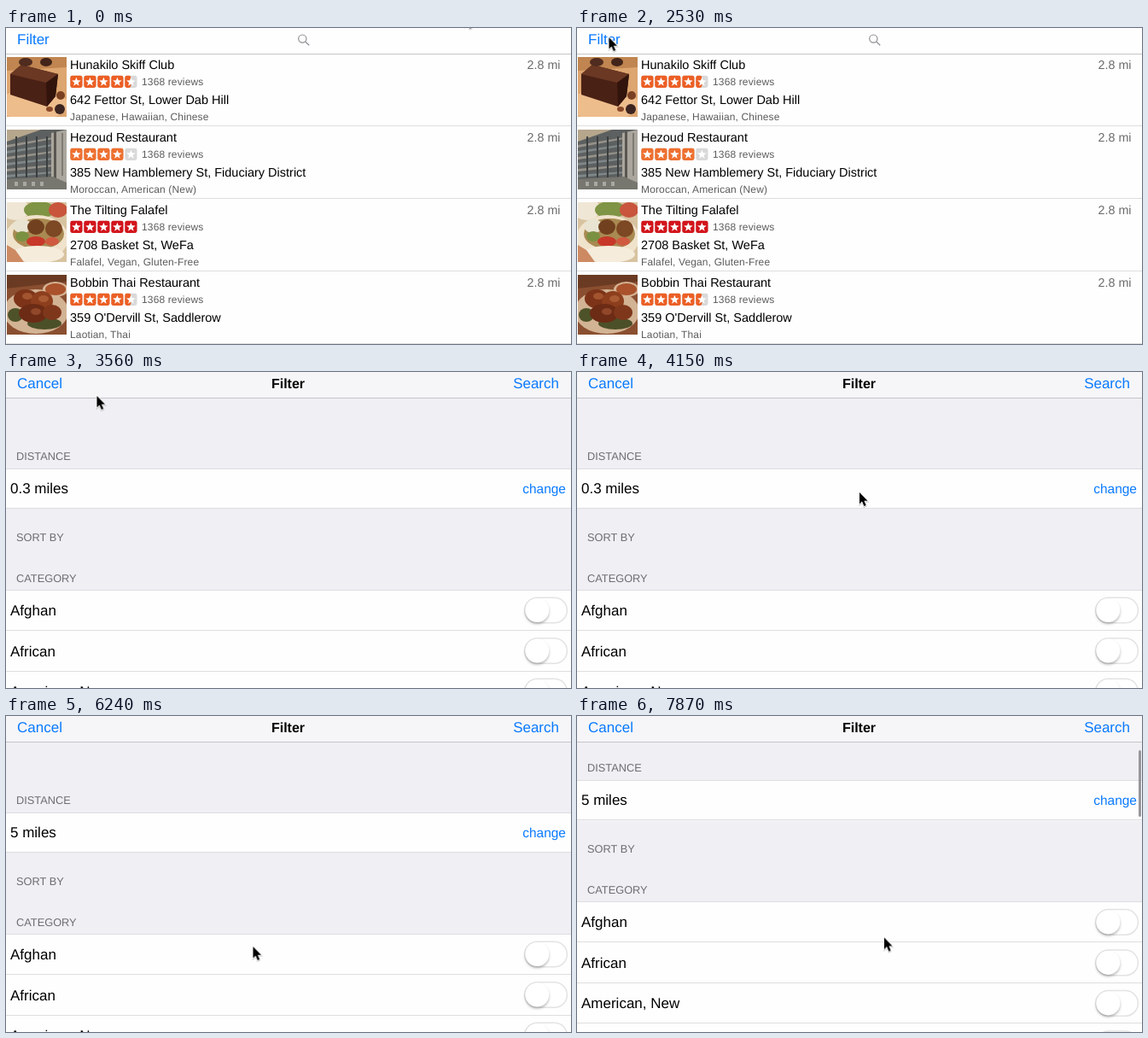
These frames come from a looping animation (662x370 px, 8000 ms). An HTML page:

```html
<!DOCTYPE html>
<html lang="en">
<head>
<meta charset="utf-8">
<title>Restaurant filter</title>
<style>
  html, body { margin: 0; width: 100%; height: 100%; overflow: hidden; background: #fff; }
  svg { display: block; }
  text {
    font-family: "Liberation Sans", Arial, Helvetica, sans-serif;
    white-space: pre; text-rendering: geometricPrecision;
  }
  .line { fill: #dedee0; shape-rendering: crispEdges; }
  .edge { fill: #c6c6c9; shape-rendering: crispEdges; }
  .name { font-size: 14.5px; }
  .small { font-size: 12px; letter-spacing: .14px; fill: #5c5c5c; }
  .dist { font-size: 14.3px; fill: #6a6a6a; text-anchor: end; }
  .link { font-size: 17px; fill: #0a7aff; }
  .title { font-size: 16px; font-weight: 700; text-anchor: middle; }
  .cell { font-size: 17px; }
  .head { font-size: 12.8px; fill: #6d6d72; }
  .change { font-size: 15.5px; fill: #0a7aff; text-anchor: end; }
  .end { text-anchor: end; }
  .knob { fill: #fff; filter: drop-shadow(0 2px 1.5px rgba(0,0,0,.28)); }

  .anim { animation: 8s step-end infinite; }
  #cursor { animation-name: cursor; }
  #open { animation-name: press; }
  #photo0 { animation-name: squash; }
  #modal { animation-name: present; }
  #bar { animation-name: bar; }
  #body { animation-name: scroll; }
  #menu { animation-name: menu; }
  #before { animation-name: before; }
  #after { animation-name: after; }
  #thumb { animation-name: thumb; }

  @keyframes cursor {
    0% { transform: translate(538px, -15.5px); }
    7.5% { transform: translate(538px, -40px); }
    15% { transform: translate(379px, 1px); }
    16.8% { transform: translate(330px, 14px); }
    18.7% { transform: translate(266px, 22px); }
    20.5% { transform: translate(206px, 25px); }
    22.3% { transform: translate(140px, 25px); }
    24.2% { transform: translate(88px, 23px); }
    26% { transform: translate(54px, 20px); }
    27.875% { transform: translate(39px, 17px); }
    29.75% { transform: translate(38px, 13px); }
    31.625% { transform: translate(37.5px, 11px); }
    42.6% { transform: translate(58px, 17px); }
    44.5% { transform: translate(106.5px, 28px); }
    46.3% { transform: translate(220px, 66px); }
    48.2% { transform: translate(317px, 92px); }
    50% { transform: translate(329px, 137px); }
    51.875% { transform: translate(331px, 141px); }
    65% { transform: translate(331px, 158.5px); }
    66.85% { transform: translate(323px, 190px); }
    68.7% { transform: translate(311px, 222px); }
    70.55% { transform: translate(300px, 248px); }
    72.4% { transform: translate(292px, 264px); }
    74.25% { transform: translate(289.5px, 270px); }
    87.375% { transform: translate(312px, 286px); }
    89.2% { transform: translate(346px, 303px); }
    91% { transform: translate(360px, 309px); }
    96.625% { transform: translate(360px, 287px); }
    98.375%, 100% { transform: translate(360px, 259.5px); }
  }
  @keyframes press {
    0% { opacity: 1; }
    37.125% { opacity: .3; }
    39% { opacity: .7; }
    40.8%, 100% { opacity: 1; }
  }
  @keyframes squash {
    0% { transform: none; }
    39% { transform: scaleY(.53); }
    44.5%, 100% { transform: none; }
  }
  @keyframes present {
    0% { transform: translateY(380px); }
    39% { transform: translateY(73px); }
    40.8% { transform: translateY(10px); }
    42.6%, 100% { transform: none; }
  }
  @keyframes bar {
    0% { fill: #fdfdfd; }
    42.6%, 100% { fill: #f6f6f8; }
  }
  @keyframes scroll {
    0% { transform: none; }
    96.625% { transform: translateY(-12px); }
    98.375%, 100% { transform: translateY(-37.6px); }
  }
  @keyframes menu {
    0% { visibility: hidden; }
    55.625% { visibility: visible; }
    78%, 100% { visibility: hidden; }
  }
  @keyframes before {
    0% { visibility: visible; }
    78%, 100% { visibility: hidden; }
  }
  @keyframes after {
    0% { visibility: hidden; }
    78%, 100% { visibility: visible; }
  }
  @keyframes thumb {
    0% { visibility: hidden; transform: none; }
    96.625% { visibility: visible; transform: translateY(-4.5px); }
    98.375%, 100% { visibility: visible; transform: none; }
  }
</style>
</head>
<body>
<svg id="stage" width="662" height="370"></svg>
<script>
const label = (x, y, cls, str) => `<text x="${x}" y="${y}" class="${cls}">${str}</text>`;
const box = (x, y, w, h, fill, more = '') =>
  `<rect x="${x}" y="${y}" width="${w}" height="${h}" fill="${fill}" ${more}/>`;
const line = (y, cls = 'line') => `<rect class="${cls}" y="${y}" width="662" height="1"/>`;
const blob = (x, y, rx, ry, fill) => `<ellipse cx="${x}" cy="${y}" rx="${rx}" ry="${ry}" fill="${fill}"/>`;
const poly = (points, fill) => `<polygon points="${points}" fill="${fill}"/>`;
const range = (n, fn) => Array.from({ length: n }, (_, i) => fn(i)).join('');

const cake = box(0, 0, 70, 70, '#dda56f') + poly('0,0 70,0 70,12 0,16', '#c08550') +
  blob(30, 56, 42, 18, '#eebd8c') + poly('4,20 17,9 60,20 57,46 47,58 4,44', '#4a2115') +
  poly('4,20 17,9 60,20 46,30', '#6b3824') + poly('46,30 60,20 57,46 47,58', '#32140c') +
  blob(22, 6, 8, 5, '#4f2c1f') + blob(46, 6, 7, 5, '#42241a') +
  blob(63, 45, 5, 5, '#7a4022') + blob(62, 61, 6, 6, '#3c2420') + blob(50, 61, 4, 3, '#8a4a2a');

const hall = box(0, 0, 70, 70, '#5d6060') + poly('0,0 40,0 0,14', '#b5a68c') +
  range(6, i => poly(`0,${18 + i * 7} 54,${9 + i * 8} 54,${11 + i * 8} 0,${21 + i * 7}`, i % 2 ? '#7f8788' : '#96928a')) +
  range(4, i => box(10 + i * 12, 8, 2, 48, '#3a3e3f')) +
  poly('52,4 70,0 70,64 52,56', '#aaa69d') + box(55, 2, 3, 56, '#5a5650') + box(64, 4, 2, 50, '#807b72') +
  poly('0,58 54,55 70,62 70,70 0,70', '#77766f') + range(4, i => box(9 + i * 10, 61, 4, 5, '#a8a8a3'));

const wrap = box(0, 0, 70, 70, '#d8c3a0') + blob(10, 8, 16, 13, '#efe6d6') + blob(38, 9, 18, 10, '#7f9444') +
  blob(60, 9, 11, 9, '#c8553c') + blob(35, 42, 37, 27, '#f0e3cc') + blob(37, 37, 30, 18, '#a98a52') +
  blob(18, 28, 11, 8, '#e9e4d2') + blob(34, 29, 10, 9, '#70401f') + blob(55, 31, 10, 10, '#7d4824') +
  blob(18, 40, 8, 6, '#7b9142') + blob(34, 46, 11, 6, '#c8382a') + blob(53, 46, 8, 5, '#d05a40') +
  blob(36, 61, 31, 10, '#f5ecdc') + poly('0,50 10,56 20,70 0,70', '#cd8a62');

const fried = box(0, 0, 70, 70, '#8a4f30') + poly('0,0 70,0 70,8 0,16', '#6b3a22') + blob(34, 43, 38, 26, '#d2b394') +
  blob(57, 17, 15, 9, '#d6b394') + blob(57, 17, 12, 7, '#a9522c') + blob(10, 47, 9, 8, '#4d5228') +
  blob(44, 57, 20, 7, '#4c5028') + blob(22, 28, 14, 11, '#7c3318') + blob(41, 31, 13, 12, '#8c3e1d') +
  blob(31, 45, 17, 11, '#6c2b14') + blob(53, 44, 11, 9, '#7f371b') + blob(24, 25, 6, 4, '#a2542f') +
  blob(43, 28, 6, 4, '#a85a33') + blob(34, 43, 6, 4, '#91472a');

const shops = [
  ['Hunakilo Skiff Club', '642 Fettor St, Lower Dab Hill', 'Japanese, Hawaiian, Chinese', 4.5, '#ec5f25', cake],
  ['Hezoud Restaurant', '385 New Hamblemery St, Fiduciary District', 'Moroccan, American (New)', 4, '#ee7030', hall],
  ['The Tilting Falafel', '2708 Basket St, WeFa', 'Falafel, Vegan, Gluten-Free', 5, '#d2151b', wrap],
  ['Bobbin Thai Restaurant', "359 O'Dervill St, Saddlerow", 'Laotian, Thai', 4.5, '#ec5f25', fried]
];

function star(cx, cy, r) {
  const pts = Array.from({ length: 10 }, (_, i) => {
    const a = i * Math.PI / 5, d = i % 2 ? r * .43 : r;
    return `${(cx + d * Math.sin(a)).toFixed(2)},${(cy - d * Math.cos(a)).toFixed(2)}`;
  });
  return poly(pts.join(' '), '#fff');
}

const stars = (score, color) => range(5, i => {
  const x = 75.3 + i * 16, part = Math.min(1, Math.max(0, score - i));
  return box(x, 55.8, 14.2, 14.2, '#d9d9d9', 'rx="2.4"') +
    (part ? box(x, 55.8, 14.2 * part, 14.2, color, 'rx="2.4"') : '') + star(x + 7.1, 63.2, 5.5);
});

const shop = ([name, street, kind, score, color, photo], i) => `<g transform="translate(0 ${i * 85})">
  <g transform="translate(1 34)"><g id="photo${i}" class="anim"><svg width="70" height="70">${photo}</svg></g></g>
  ${label(75, 48, 'name', name)}${stars(score, color)}${label(159, 67, 'small', '1368 reviews')}
  ${label(75, 89, 'name', street)}${label(75, 108, 'small', kind)}${label(649.5, 48, 'dist', '2.8 mi')}
  ${line(114)}</g>`;

const toggle = y => box(607.8, y - 14.8, 49.6, 29.6, '#fff', 'rx="14.8" stroke="#e3e3e5" stroke-width="1.5"') +
  `<circle class="knob" cx="622.3" cy="${y}" r="14"/>`;

const list = box(0, 0, 662, 370, '#fefefe') + line(30, 'edge') +
  `<g id="open" class="anim">${label(13, 19, 'link', 'Filter')}</g>
  <g fill="none" stroke="#8e8e93" stroke-width="1.2"><circle cx="347.3" cy="12.6" r="4.6"/><path d="M350.7 16 L355.2 20.3"/></g>` +
  shops.map(shop).join('');

const categories = ['Afghan', 'African', 'American, New', ''];
const miles = ['0.3 miles', '1 mile', '3 miles', '5 miles', '10 miles', '20 miles'];

const form = label(12, 103, 'head', 'DISTANCE') + box(0, 113, 662, 47, '#fefefe') + line(113) + line(159) +
  `<g id="before" class="anim">${label(5, 142, 'cell', '0.3 miles')}</g>
  <g id="after" class="anim">${label(5, 142, 'cell', '5 miles')}</g>` +
  label(656, 141.5, 'change', 'change') +
  label(12, 198, 'head', 'SORT BY') + label(12, 246, 'head', 'CATEGORY') + box(0, 255, 662, 200, '#fefefe') +
  categories.map((c, i) => {
    const y = 255 + i * 47.5;
    return line(Math.floor(y)) + label(5, y + 30, 'cell', c) + toggle(y + 24);
  }).join('') +
  `<g id="menu" class="anim">${box(0, 160, 662, 300, '#fefefe')}` +
  miles.map((m, i) => line(159 + i * 37) + label(5, 184 + i * 37, 'cell', m)).join('') + '</g>';

const modal = `<g id="modal" class="anim">${box(0, 0, 662, 370, '#efeff4')}
  <g id="body" class="anim">${form}</g>
  <rect id="bar" class="anim" width="662" height="30"/>${line(30, 'edge')}
  ${label(13, 19, 'link', 'Cancel')}${label(330.5, 19, 'title', 'Filter')}${label(648, 19, 'link end', 'Search')}
  <g id="thumb" class="anim">${box(658, 40, 3, 78, '#97979b', 'rx="1.5"')}</g></g>`;

const cursor = `<g id="cursor" class="anim"><path d="M0 0 V13.4 L3 10.6 L5.4 15.9 L7.7 14.9 L5.4 9.8 H9.5 Z"
  fill="#000" stroke="#fff" stroke-width="1.6" paint-order="stroke" style="filter:drop-shadow(0 1px .7px rgba(0,0,0,.25))"/></g>`;

document.getElementById('stage').innerHTML = list + modal + cursor;
</script>
</body>
</html>
```
